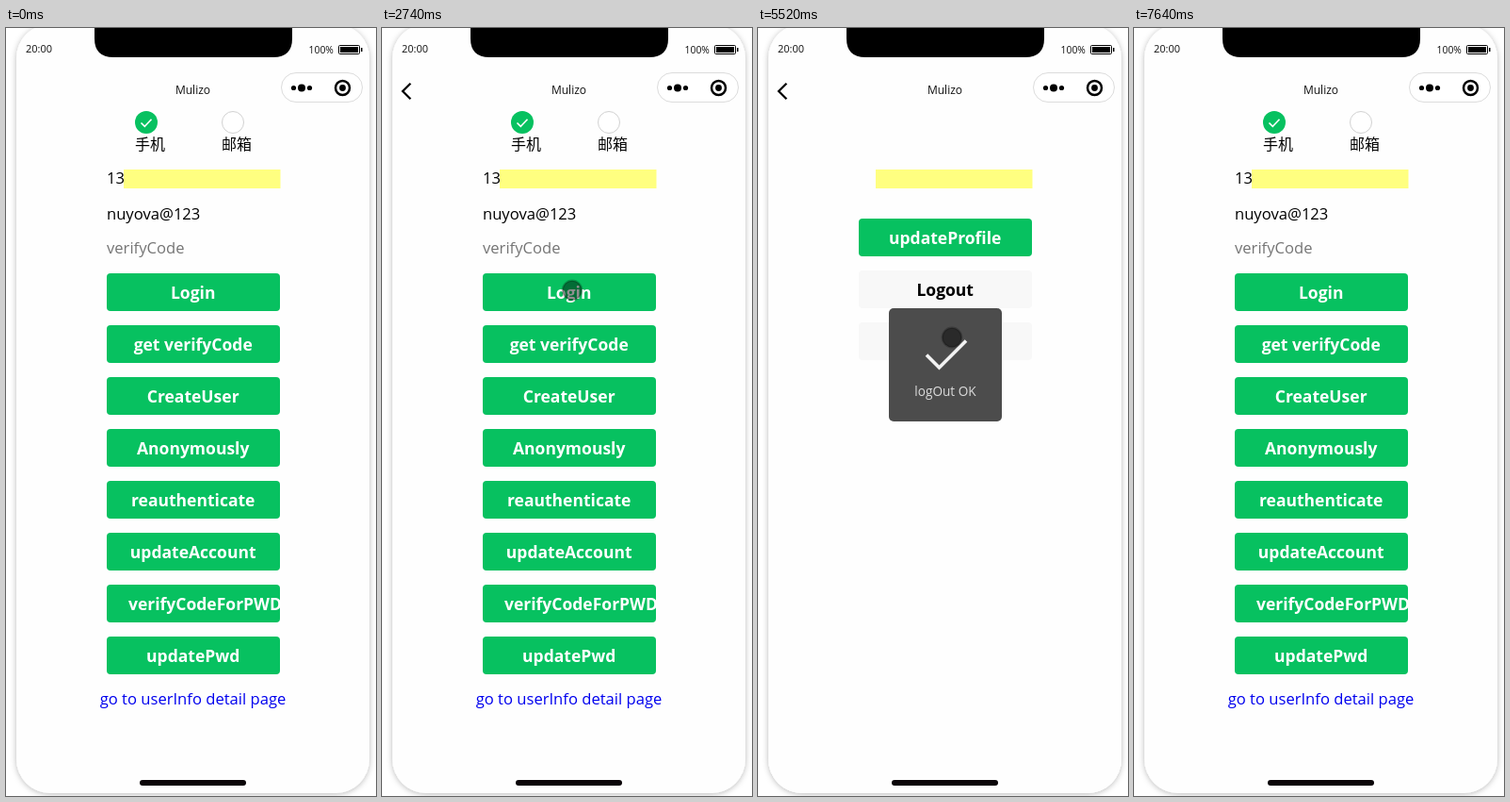
Animation, 393 px wide and 814 px high, one loop 8.74 s. Source, as an HTML page:

```html
<!DOCTYPE html>
<html lang="en">
<head>
<meta charset="utf-8">
<title>Sign-in demo</title>
<style>
  html, body { margin: 0; width: 100%; height: 100%; overflow: hidden; background: #fff; }
  svg { display: block; width: 100%; height: 100%; }
  text { font-family: "Open Sans", "Noto Sans CJK SC", "Noto Sans CJK", "Noto Sans", sans-serif; font-size: 16.6px; white-space: pre; }
  .mid { text-anchor: middle; }
  .btn { font-size: 17.5px; font-weight: 700; }
  .cjk { font-family: "Noto Sans CJK SC", "Noto Sans CJK", sans-serif; font-size: 16px; }
  .json { font-size: 16.4px; }
  .line { fill: none; stroke-linecap: butt; stroke-linejoin: miter; }
</style>
</head>
<body>
<svg viewBox="0 0 393 814" xmlns="http://www.w3.org/2000/svg">
  <defs>
    <clipPath id="body"><rect x="11" y="-4" width="375" height="815" rx="36"/></clipPath>
    <filter id="shadow" x="-10%" y="-5%" width="120%" height="110%">
      <feDropShadow dx="0" dy="1" stdDeviation="3" flood-color="#000" flood-opacity=".28"/>
    </filter>
  </defs>
  <rect width="393" height="814" fill="#fff"/>
  <rect x="11" y="-4" width="375" height="815" rx="36" fill="#fefefe" filter="url(#shadow)"/>

  <g clip-path="url(#body)">
    <g id="login">
      <circle cx="149" cy="100" r="12" fill="#07c160"/>
      <path class="line" d="M143.5 100.5l3.8 3.8l7.2-7.6" stroke="#fff" stroke-width="1.6"/>
      <circle cx="241" cy="100" r="11.5" fill="#fff" stroke="#d1d1d1"/>
      <text class="cjk" x="137" y="129">手机</text>
      <text class="cjk" x="229" y="129">邮箱</text>
      <text x="107" y="165">13</text>
      <text x="107" y="203">nuyova@123</text>
      <text x="107" y="239" fill="#757575">verifyCode</text>
      <text class="mid" x="198.5" y="717" fill="#00e">go to userInfo detail page</text>
    </g>
    <g id="detail">
      <rect x="11" y="86" width="376" height="728" fill="#fefefe"/>
      <g id="json"></g>
      <g id="actions"></g>
    </g>
    <rect x="125" y="150" width="166.5" height="20" fill="#ffff80"/>
  </g>

  <g id="toast">
    <rect x="139" y="297" width="120" height="120" rx="5" fill="#4c4c4c"/>
    <path class="line" d="M179 346.5L192.5 360L221 331.5" stroke="#f2f2f2" stroke-width="3.6"/>
    <text class="mid" x="199" y="390" fill="#dcdcdc" style="font-size:13.6px">logOut OK</text>
  </g>

  <path d="M94 0H304V11Q304 31 284 31H114Q94 31 94 11Z"/>
  <text x="21" y="26" fill="#111" style="font-size:11px">20:00</text>
  <text x="321.5" y="27" fill="#111" style="font-size:10.4px">100%</text>
  <rect x="353.5" y="18.5" width="22" height="9" rx="1" fill="none" stroke="#000"/>
  <rect x="355" y="20" width="19" height="6"/>
  <rect x="377" y="21" width="1.5" height="4"/>
  <text class="mid" x="198.5" y="70" fill="#111" style="font-size:12px">Mulizo</text>
  <rect x="292.5" y="47.5" width="86" height="31" rx="15.5" fill="#fff" stroke="#dcdcdc"/>
  <circle cx="305.5" cy="63.5" r="2.6"/>
  <circle cx="314" cy="63.5" r="4"/>
  <circle cx="322.5" cy="63.5" r="2.6"/>
  <circle cx="357.5" cy="63.5" r="7.5" fill="none" stroke="#000" stroke-width="2.5"/>
  <circle cx="357.5" cy="63.5" r="3.4"/>
  <path id="back" class="line" d="M30.3 58.7L22 67L30.3 75.3" stroke="#000" stroke-width="2.3"/>
  <rect x="142" y="797" width="113" height="6" rx="3" fill="#0a0508"/>

  <g id="cursor">
    <circle id="touch" r="10.3" fill="rgba(0,0,0,.44)" stroke="rgba(0,0,0,.22)" stroke-width="2.2"/>
    <path id="hand" fill="#fff" stroke="#000" d="M0 1.5Q0-.5 1.7-.5T3.4 1.5V9Q4 7.3 5.3 7.7T6.6 9.2Q7.2 8 8.4 8.6T9.5 10Q10.5 9.3 11.4 10.4V16Q11.4 19 9.5 20.5V23H1V20.5L-5.5 13.5Q-6 11.5-4 11.8L0 15Z"/>
    <path id="arrow" fill="#fff" stroke="#000" d="M.5.5V16.5L4.2 13L6.8 18.6L9 17.6L6.5 12H11.6Z"/>
  </g>
</svg>
<script>
const LOOP = 8740;
const GREEN = '#07c160', GREEN_DOWN = '#06ad56', PLAIN = '#f8f8f8', PLAIN_DOWN = '#dedede';
const $ = id => document.getElementById(id);

function add(parent, tag, attrs, text) {
  const el = document.createElementNS('http://www.w3.org/2000/svg', tag);
  for (const key in attrs) el.setAttribute(key, attrs[key]);
  if (text) el.textContent = text;
  return parent.appendChild(el);
}

function button(parent, y, label, fill, color) {
  const box = add(parent, 'rect', { x: 107, y, width: 184, height: 40, rx: 4, fill });
  // The one label wider than its padding box starts at the padding edge.
  const wide = label.length > 15;
  const text = add(parent, 'text', {
    class: wide ? 'btn' : 'btn mid', x: wide ? 130 : 198.7, y: y + 26.5, fill: color
  }, label);
  return { box, text };
}

const loginButtons = ['Login', 'get verifyCode', 'CreateUser', 'Anonymously', 'reauthenticate',
  'updateAccount', 'verifyCodeForPWD', 'updatePwd']
  .map((label, i) => button($('login'), 260 + 55 * i, label, GREEN, '#fff'));
const [, logout] = ['updateProfile', 'Logout', 'deleteUser']
  .map((label, i) => button($('actions'), 265 + 55 * i, label, i ? PLAIN : GREEN, i ? '#000' : '#fff'));

['{"uid":"747847665781312768","anonymous":fals',
  'e,"email":"","phone":"+86-10012345678","provid',
  'erId":"11"}']
  .forEach((line, i) => add($('json'), 'text', { class: 'json', x: 11, y: 204 + 21 * i }, line));

const moves = [
  { from: 130, to: 510, steps: 9, path: [[321, 777], [321, 710], [321, 590], [323, 475], [325, 420],
    [338, 398], [350, 385], [358, 378], [360, 376]] },
  { from: 1020, to: 1630, steps: 13, path: [[359, 374], [352, 358], [342, 342], [300, 310],
    [245, 288], [212, 280], [202, 278]] },
  { from: 3860, to: 4270, steps: 8, path: [[202, 281], [205, 312], [208, 334.5]] },
  { from: 5520, to: 6060, steps: 13, path: [[206, 328], [190, 290], [150, 215], [110, 150],
    [80, 125], [50, 97], [28, 72]] },
  { from: 7000, to: 7640, steps: 15, path: [[30, 75], [62, 110], [150, 210], [260, 350],
    [332, 500], [342, 640], [330, 760], [322, 815]] }
];

// Horizontal page offset, held from each time on.
const slides = [[0, 375], [2840, 300], [2880, 180], [2920, 70], [2970, 0],
  [6390, 40], [6440, 130], [6490, 219], [6540, 305], [6620, 375]];

const within = (t, a, b) => t >= a && t < b;
const show = (el, on) => el.setAttribute('display', on ? 'inline' : 'none');
const shift = (el, x, y) => el.setAttribute('transform', `translate(${x} ${y})`);

function along(path, p) {
  const at = p * (path.length - 1);
  const i = Math.min(Math.floor(at), path.length - 2);
  return [0, 1].map(k => path[i][k] + (path[i + 1][k] - path[i][k]) * (at - i));
}

function pointer(t) {
  const move = moves.filter(m => t >= m.from).pop();
  if (!move) return null;
  const last = move.steps - 1;
  const step = Math.floor((t - move.from) / (move.to - move.from) * last + 1e-6);
  return along(move.path, Math.min(step, last) / last);
}

function draw(t) {
  const offset = slides.filter(s => t >= s[0]).pop()[1];
  show($('detail'), offset < 375);
  shift($('detail'), offset, 0);
  show($('back'), within(t, 2740, 6260));

  const cleared = t >= 5010;
  show($('json'), !cleared);
  shift($('actions'), 0, cleared ? -63 : 0);
  show($('toast'), within(t, 5010, 6260));
  $('toast').setAttribute('opacity', t < 5060 ? 0.6 : 1);

  loginButtons[0].box.setAttribute('fill', within(t, 2230, 2560) ? GREEN_DOWN : GREEN);
  const down = within(t, 4830, 5010);
  logout.box.setAttribute('fill', down ? PLAIN_DOWN : PLAIN);
  logout.text.setAttribute('fill', down ? '#5a5a5a' : '#000');

  const pos = t < 7640 ? pointer(t) : null;
  show($('cursor'), pos);
  if (!pos) return;
  shift($('cursor'), ...pos);
  const overHeader = pos[1] < 87;
  show($('touch'), !overHeader);
  show($('hand'), overHeader && t < 6260);
  show($('arrow'), overHeader && t >= 6260);
  $('touch').setAttribute('fill', within(t, 4730, 5010) ? 'rgba(182,170,20,.8)'
    : within(t, 2190, 2460) ? 'rgba(0,0,0,.55)' : 'rgba(0,0,0,.44)');
}

const start = performance.now();
function tick() {
  draw((performance.now() - start) % LOOP);
  requestAnimationFrame(tick);
}
tick();
</script>
</body>
</html>
```
